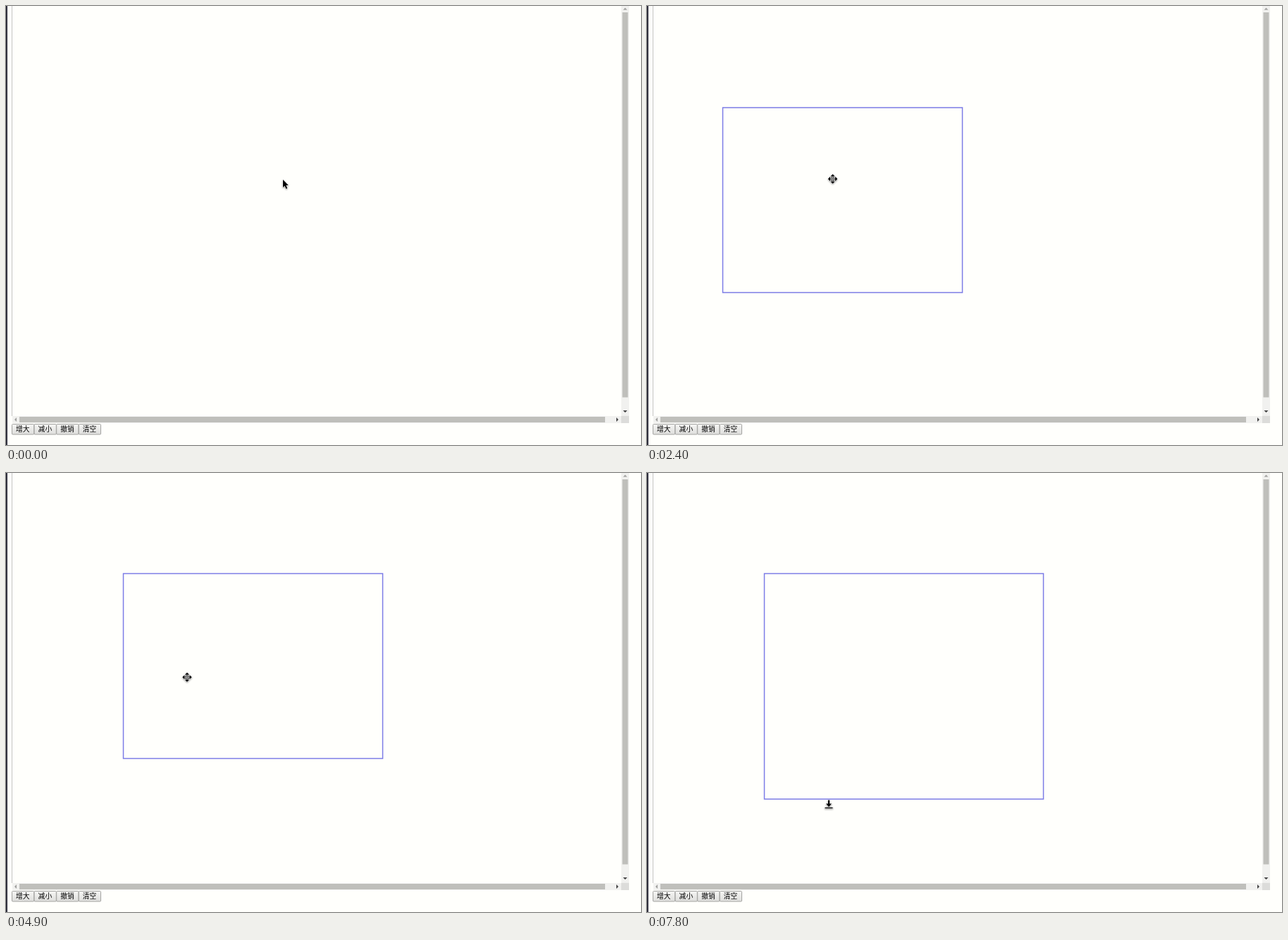
An HTML page that plays this animation: 901 by 622 pixels, repeating every 8000 ms.

```html
<!DOCTYPE html>
<html lang="zh">
<head>
<meta charset="utf-8">
<title>Drawing a box</title>
<style>
html, body { margin: 0; width: 100%; height: 100%; overflow: hidden; background: #fffffc; }
svg { display: block; width: 100%; height: 100%; }
text { font: 9.8px "Noto Sans CJK SC", "Noto Sans CJK", sans-serif; text-anchor: middle; fill: #000; }
.cursor { filter: drop-shadow(.8px 1.2px .8px rgba(0, 0, 0, .4)); }
.cursor path { stroke: #fff; stroke-width: 1; paint-order: stroke; }
</style>
</head>
<body>
<svg viewBox="0 0 901 622">
  <defs>
    <linearGradient id="face" x2="0" y2="1">
      <stop stop-color="#f6f6f4"/><stop offset="1" stop-color="#dededc"/>
    </linearGradient>
  </defs>
  <rect width="901" height="622" fill="#fffffc"/>
  <rect width="2" height="622" fill="#30303e"/>
  <path d="M8.5 0V581" stroke="#c4c4c2"/>

  <path d="M873 0h11v580h-11zM9 581h864v10H9z" fill="#f1f1ef"/>
  <path d="M874.5 9h8v545.500h-8zM19 582h831v8H19z" fill="#bfbfbb"/>
  <rect x="873" y="580.500" width="11" height="10.500" fill="#dcdcda"/>
  <path d="M875.500 5.500h6l-3-3zM15 583v6l-3-3z" fill="#a0a09e"/>
  <path d="M875.500 573h6l-3 3zM866 583v6l3-3z" fill="#444"/>
  <g id="buttons"></g>

  <rect id="box" fill="none"/>
  <g class="cursor" id="arrow">
    <path d="M0 0V11L2.500 8.700L4.400 13L6.200 12.200L4.400 8H7.700Z"/>
  </g>
  <g class="cursor" id="move">
    <path d="M0-6.700L3.200-3.500H-3.200ZM0 6.700L3.200 3.500H-3.200ZM-6.700 0L-3.500-3.200V3.200ZM6.700 0L3.500-3.200V3.200Z"/>
    <circle r="2.600" fill="#ccc" stroke="#333"/>
    <circle r="1" fill="#333"/>
  </g>
  <g class="cursor" id="west">
    <path d="M-.700-5.500H.700V5.500H-.700ZM1.200 0L6-4V-1.100H11.500V1.100H6V4Z"/>
  </g>
  <g class="cursor" id="south">
    <path d="M-5.500-.800H5.500V.700H-5.500ZM0-1.300L-4-6H-1.100V-11H1.100V-6H4Z"/>
  </g>
  <g class="cursor" id="corner">
    <path d="M0-10V0H-10.500V-1.600H-1.600V-10ZM-2.500-2.500V-8.500L-4.400-6.600L-8.300-10.500L-10-8.800L-6.200-4.900L-8.500-2.500Z"/>
  </g>
</svg>
<script>
const LOOP = 8000, TICK = 100;
const $ = id => document.getElementById(id);
const kinds = ['arrow', 'move', 'west', 'south', 'corner'];

// Each row: first tick, last tick, then the values reached at the last tick.
const pointer = [
  [0, 0, 393, 246, 'arrow'],
  [200, 400, 119, 164, 'arrow'],
  [600, 600, 94, 137, 'arrow'],
  [700, 1400, 433, 398, 'arrow'],
  [1700, 2000, 250, 239, 'move'],
  [2300, 2400, 263.5, 245, 'move'],
  [2500, 2800, 349.5, 244, 'move'],
  [3000, 3000, 350.5, 243.5, 'move'],
  [3100, 3100, 264, 264, 'move'],
  [3300, 3300, 215, 263, 'move'],
  [3400, 3400, 170, 257, 'arrow'],
  [3500, 3500, 177, 256, 'arrow'],
  [3700, 3700, 187.5, 262, 'west'],
  [4000, 4000, 189, 262, 'west'],
  [4300, 4300, 187, 262, 'west'],
  [4400, 4700, 167, 261.5, 'west'],
  [4900, 5100, 514, 369, 'move'],
  [5300, 5300, 529, 393, 'move'],
  [5400, 5400, 544, 405, 'arrow'],
  [5500, 5600, 537, 402, 'arrow'],
  [5800, 5800, 545.5, 412.5, 'corner'],
  [6100, 6200, 542, 412, 'corner'],
  [6500, 6500, 538.5, 409, 'corner'],
  [6900, 7300, 566, 466, 'corner'],
  [7400, 7400, 541, 450, 'move'],
  [7600, 7600, 430, 455, 'move'],
  [7700, 7700, 300, 472, 'south'],
  [7800, 7800, 258, 474.5, 'south']
];
// Left, top, right, bottom.
const edges = [
  [0, 0, 94.5, 137.5, 94.5, 137.5],
  [700, 1400, 94.5, 137.5, 434.5, 398.5],
  [2300, 2400, 107.5, 144, 447.5, 406],
  [2500, 2800, 193.5, 143, 533.5, 405],
  [3000, 3000, 194.5, 142.5, 534.5, 404.5],
  [4300, 4300, 186.5, 142.5, 534.5, 404.5],
  [4400, 4700, 166.5, 142.5, 534.5, 404.5],
  [6900, 7300, 166.5, 142.5, 562.5, 462]
];

function pose(rows, t) {
  let i = rows.length - 1;
  while (i && rows[i][0] > t) i--;
  const [start, end, ...to] = rows[i];
  if (!i || t >= end) return to;
  const from = rows[i - 1].slice(2);
  const p = (t - start + TICK) / (end - start + TICK);
  const e = p * p * (3 - 2 * p);
  return to.map((v, k) => typeof v === 'number' ? from[k] + (v - from[k]) * e : v);
}

function set(el, attrs) {
  for (const key in attrs) el.setAttribute(key, attrs[key]);
}

$('buttons').innerHTML = ['增大', '减小', '撤销', '清空'].map((label, i) => {
  const x = 8.5 + i * 31.6;
  return `<rect x="${x}" y="592.5" width="31.2" height="14.5" rx="1" fill="url(#face)" stroke="#a3a3a1"/>
    <text x="${x + 15.3}" y="603.2">${label}</text>`;
}).join('');

function draw(ms) {
  const t = Math.floor(ms % LOOP / TICK) * TICK;
  const [l, top, r, b] = pose(edges, t);
  const dashed = t < 1700;
  set($('box'), {
    x: l, y: top, width: r - l, height: b - top,
    visibility: t < 700 ? 'hidden' : 'visible',
    stroke: dashed ? '#5a62e6' : '#7c7ce6',
    'stroke-width': dashed ? 1.2 : 1.5,
    'stroke-dasharray': dashed ? '4 4' : 'none'
  });
  const [x, y, kind] = pose(pointer, t);
  for (const k of kinds) {
    set($(k), { visibility: k === kind ? 'visible' : 'hidden', transform: `translate(${x} ${y})` });
  }
}

const began = performance.now();
function frame() {
  draw(performance.now() - began);
  requestAnimationFrame(frame);
}
frame();
</script>
</body>
</html>
```
